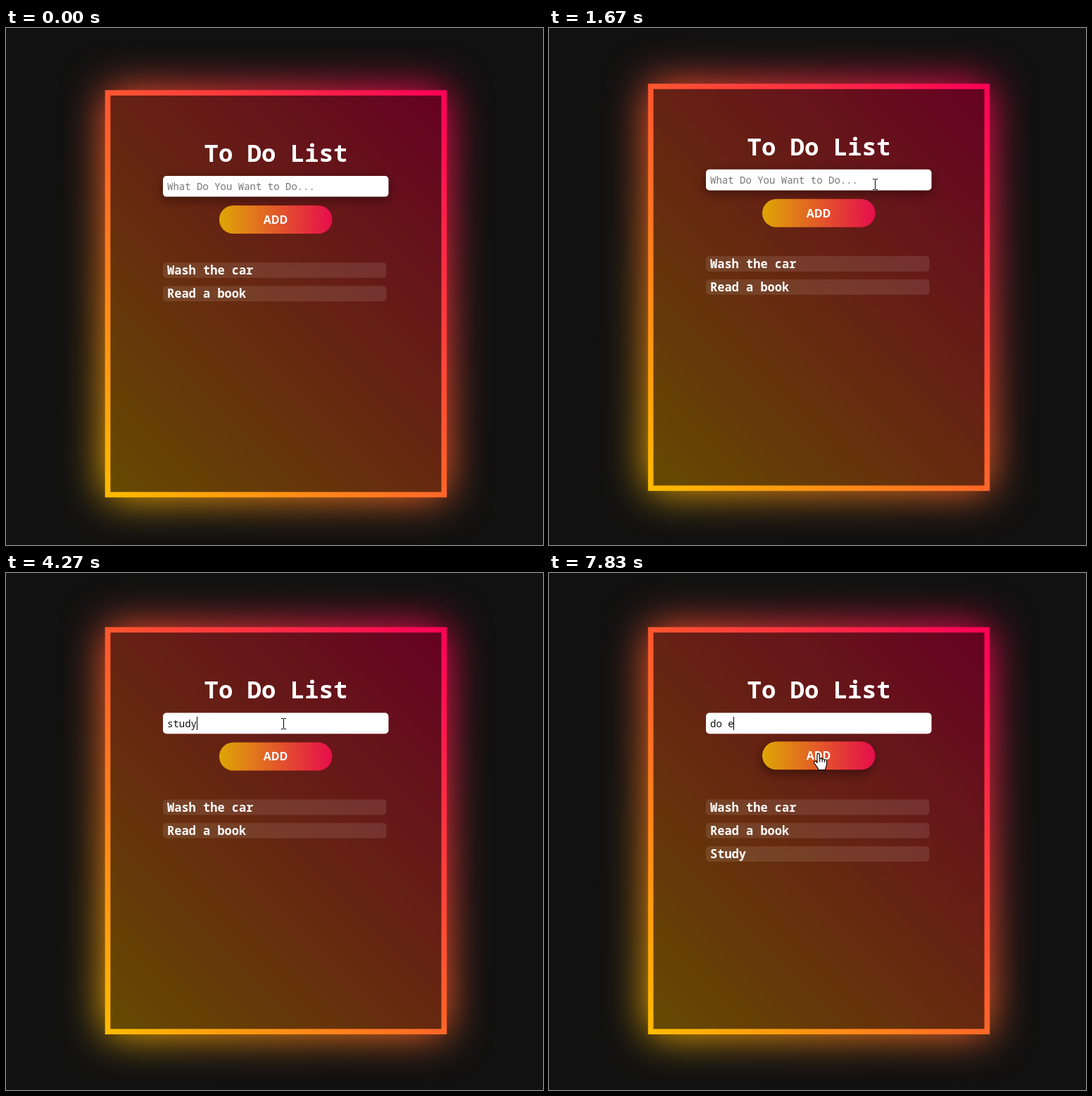
Write an HTML page that moves like this. It is 763 px wide and 734 px high and loops after 8000 ms.

```html
<!DOCTYPE html>
<html lang="en">
<head>
<meta charset="utf-8">
<title>To Do List</title>
<style>
  html, body { margin: 0; width: 100%; height: 100%; overflow: hidden; background: #111; }
  svg { display: block; width: 763px; height: 734px; }
  text { font-family: "Noto Sans Mono", "DejaVu Sans Mono", monospace; fill: #fff; }
  .title { font-size: 34px; font-weight: 700; text-anchor: middle; }
  .item text { font-size: 17px; font-weight: 700; }
  .item rect { fill: #fff; fill-opacity: .1; }
  .field { font-size: 14px; }
  .add { font: 700 16px "Noto Sans", "Open Sans", sans-serif; text-anchor: middle; }
  .glow { filter: blur(30px); }
  .shadow { filter: blur(7.5px); }
  #beam { mix-blend-mode: difference; }
  #arrow, #hand { fill: #fff; stroke: #000; stroke-width: 1.1; stroke-linejoin: round; }
</style>
</head>
<body>
<svg viewBox="0 0 763 734">
  <defs>
    <linearGradient id="warm" gradientUnits="userSpaceOnUse" x1="117.5" y1="643.3" x2="649.5" y2="111.3">
      <stop stop-color="#ffbc00"/><stop offset="1" stop-color="#ff0058"/>
    </linearGradient>
    <linearGradient id="pill">
      <stop stop-color="#dfa605"/><stop offset="1" stop-color="#e60d4c"/>
    </linearGradient>
  </defs>
  <rect width="763" height="734" fill="#111"/>
  <g id="card">
    <rect class="glow" x="140.7" y="88.2" width="485.6" height="578.2" fill="url(#warm)"/>
    <rect x="140.7" y="88.2" width="485.6" height="578.2" fill="url(#warm)"/>
    <rect x="148.4" y="95.9" width="470.2" height="562.8" fill-opacity=".6"/>
    <text class="title" x="383.5" y="189.8">To Do List</text>

    <rect id="fieldShadow" class="shadow" x="223" y="214" width="320.5" height="29.6" rx="5" opacity=".42"/>
    <rect x="223" y="210" width="320.5" height="29.6" rx="5" fill="#fff"/>
    <text id="fieldText" class="field" x="229" y="230.2"></text>
    <rect id="caret" y="215.4" width="1" height="19"/>

    <g id="button">
      <rect id="buttonShadow" class="shadow" x="301" y="257" width="160" height="40" rx="20"/>
      <rect x="303" y="252" width="160.5" height="40" rx="20" fill="url(#pill)"/>
      <text class="add" x="383" y="277.7">ADD</text>
    </g>
    <g id="list"></g>
  </g>
  <path id="beam" d="M-3 -8h3v1h1v-1h3v1h-3v14h3v1h-3v-1h-1v1h-3v-1h3v-14h-3z" fill="#fff"/>
  <path id="arrow" d="M.5 .5V16.5L4.2 13L6.8 19L9.4 17.9L6.8 12H12z"/>
  <g id="hand">
    <path d="M-2 1.2C-2 -1 1.6 -1 1.6 1.2V7.2C2.2 5.6 5 5.8 5.2 7.6C6 6.4 8.4 6.7 8.6 8.5C9.6 7.5 11.6 8 11.6 9.8V14.5C11.6 17.5 9.7 18.5 9.5 22.5H-.2C-.4 19.7 -3.2 17.2 -6 13.2C-7.6 10.8 -5 9.2 -3.2 11.2L-2 12.6z"/>
    <path d="M1.6 7V11.5M5.2 7.8V11.5M8.6 8.8V11.8" fill="none"/>
  </g>
</svg>
<script>
const LOOP = 8000, BLINK = 530, LIFT = 11.4, CHAR = 8.4;
const HOVER = 1420, FOCUS = 2200, PRESS = 5970, RELEASE = 6140;
const $ = id => document.getElementById(id);
const show = (el, on) => el.setAttribute("visibility", on ? "visible" : "hidden");
const move = (el, x, y) => el.setAttribute("transform", `translate(${x} ${y})`);

// Each entry: time, field content from then on
const typing = [
  [FOCUS, ""], [3270, "s"], [3600, "st"], [3900, "stu"], [4070, "stud"], [4270, "study"],
  [RELEASE, ""], [7400, "d"], [7500, "do"], [7600, "do "], [7830, "do e"]
];
// Each entry: time, x, y
const pointer = [
  [1170, 756, 292], [1420, 622, 255], [1530, 533, 233.5], [1650, 470, 223],
  [1800, 420, 217], [1970, 395, 214], [2030, 394, 214],
  [5130, 394, 214], [5200, 391, 227], [5270, 386, 246], [5370, 383, 257]
];
const buttonRise = [[5240, 0], [5370, 1], [PRESS, 1], [6030, 0], [RELEASE, 0], [6200, 1]];

const items = ["Wash the car", "Read a book", "Study"].map((label, i) => {
  const y = 333 + i * 33.2;
  $("list").insertAdjacentHTML("beforeend",
    `<g class="item"><rect x="223" y="${y}" width="317.6" height="21.8" rx="5"/>
     <text x="229" y="${y + 17}">${label}</text></g>`);
  return $("list").lastElementChild;
});

function track(points, t) {
  const next = points.findIndex(p => p[0] > t);
  if (next < 0) return points[points.length - 1].slice(1);
  if (next === 0) return points[0].slice(1);
  const a = points[next - 1], b = points[next], k = (t - a[0]) / (b[0] - a[0]);
  return a.slice(1).map((v, i) => v + (b[i + 1] - v) * k);
}

// CSS "ease": cubic-bezier(.25, .1, .25, 1)
function ease(x) {
  if (x <= 0) return 0;
  if (x >= 1) return 1;
  const bezier = (s, p, q) => 3 * s * (1 - s) ** 2 * p + 3 * s * s * (1 - s) * q + s ** 3;
  let lo = 0, hi = 1;
  for (let i = 0; i < 24; i++) {
    const mid = (lo + hi) / 2;
    if (bezier(mid, .25, .25) < x) lo = mid; else hi = mid;
  }
  return bezier(lo, .1, 1);
}

function drawField(t) {
  const focused = t >= FOCUS && (t < PRESS || t >= RELEASE);
  const [since, content] = typing.filter(e => e[0] <= t).pop() || [0, ""];
  const text = $("fieldText"), label = content || "What Do You Want to Do...";
  if (text.textContent !== label) text.textContent = label;
  text.style.fill = content ? "#111" : "#757575";
  show($("fieldShadow"), !focused);
  $("caret").setAttribute("x", Math.floor(229 + CHAR * content.length));
  show($("caret"), focused && Math.floor((t - since) / BLINK) % 2 === 0);
}

function drawPointer(t, lift) {
  const [x, y] = track(pointer, t);
  const inside = (left, top, right, bottom) =>
    x > left && x < right && y + lift > top && y + lift < bottom;
  const kind = inside(223, 210, 543.5, 239.6) ? "beam"
    : inside(303, 251, 463.5, 292) ? "hand" : "arrow";
  for (const id of ["beam", "arrow", "hand"]) {
    show($(id), t >= pointer[0][0] && id === kind);
    move($(id), kind === "beam" ? Math.round(x) - .5 + .5 : x, kind === "beam" ? Math.round(y) : y);
  }
}

function draw(t) {
  const lift = LIFT * ease((t - HOVER) / 500);
  move($("card"), 0, -lift);
  const [rise] = track(buttonRise, t);
  move($("button"), 0, -1.3 * rise);
  $("buttonShadow").setAttribute("opacity", .42 * rise);
  show(items[2], t >= RELEASE);
  drawField(t);
  drawPointer(t, lift);
}

const start = performance.now();
function tick() {
  draw((performance.now() - start) % LOOP);
  requestAnimationFrame(tick);
}
tick();
</script>
</body>
</html>
```
